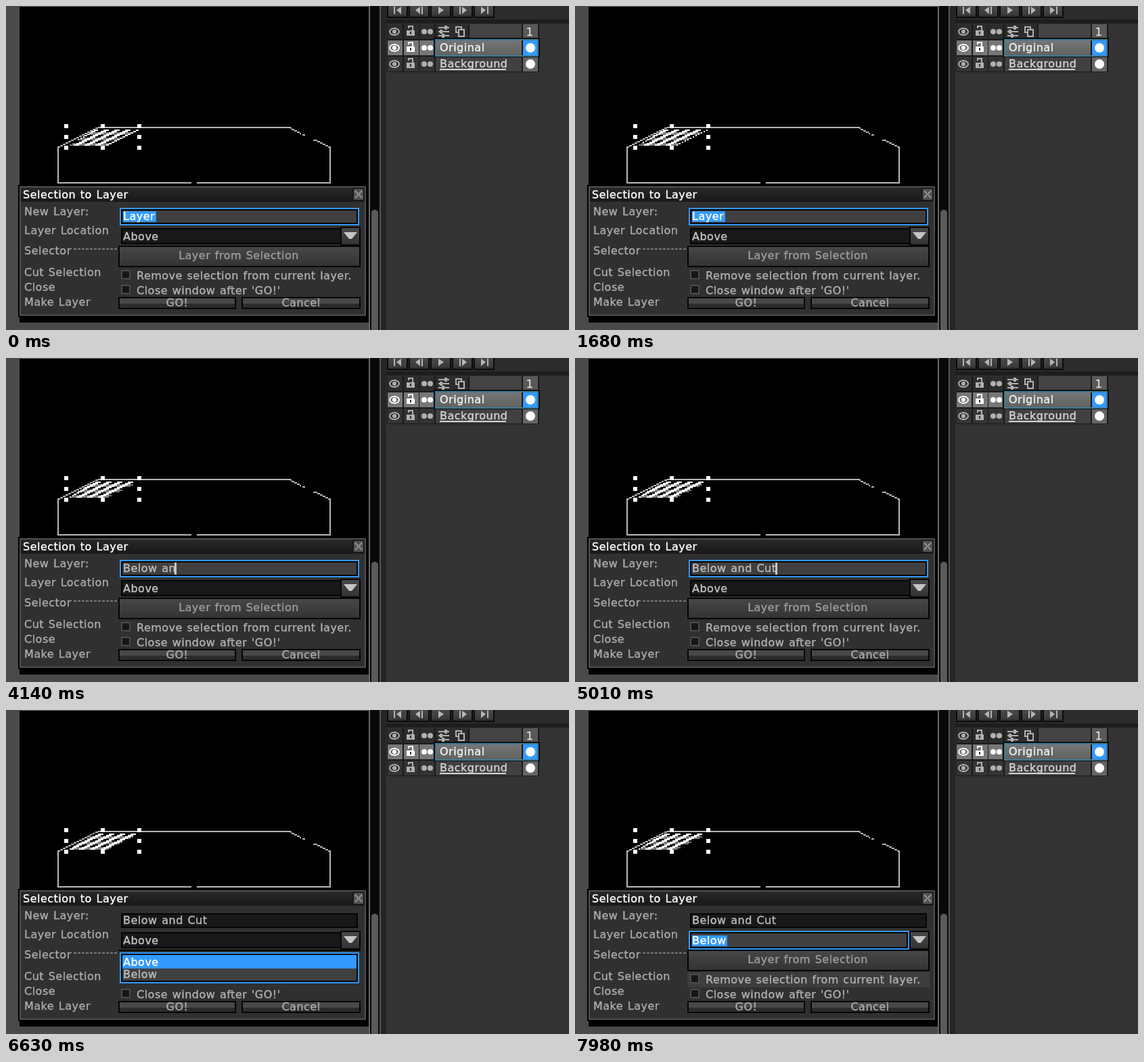
An HTML page with a canvas that plays this animation: 832 px wide and 480 px high, repeating every 8 s.

```html
<!DOCTYPE html>
<html lang="en">
<head>
<meta charset="utf-8">
<title>Selection to Layer</title>
<style>
html, body { margin: 0; width: 100%; height: 100%; overflow: hidden; background: #000; }
canvas { display: block; width: 832px; height: 480px; }
</style>
</head>
<body>
<canvas id="stage" width="832" height="480"></canvas>
<script>
const ctx = document.getElementById('stage').getContext('2d');
const LOOP = 8000;
const BLUE = '#3399ff';
const BODY = '#303030';
const NAME = 'Below and Cut';

// Times of the typed characters and of the dialog's state changes, in ms.
const KEYS = [2730, 3090, 3450, 3540, 3660, 3780, 3930, 4050, 4170, 4380, 4560, 4740, 4890];
const T = { blur: 6120, open: 6390, pick: 7110, close: 7590, hover: 7830 };

function box(x, y, x2, y2, color) {
  ctx.fillStyle = color;
  ctx.fillRect(x, y, x2 - x, y2 - y);
}

function shade(y, y2, top, bottom) {
  const g = ctx.createLinearGradient(0, y, 0, y2);
  g.addColorStop(0, top);
  g.addColorStop(1, bottom);
  return g;
}

function frame(x, y, x2, y2, edge, fill, w = 2) {
  box(x, y, x2, y2, edge);
  box(x + w, y + w, x2 - w, y2 - w, fill);
}

function setFont() {
  ctx.font = '16px "DejaVu Sans", sans-serif';
  ctx.letterSpacing = '0.5px';
  ctx.wordSpacing = '1px';
}

// Text with a hairline outline, which gives the stems two full pixels.
function text(str, x, y, color, align = 'left') {
  setFont();
  ctx.textAlign = align;
  ctx.fillStyle = ctx.strokeStyle = color;
  ctx.lineWidth = 0.4;
  ctx.fillText(str, x, y);
  ctx.strokeText(str, x, y);
  return ctx.measureText(str).width;
}

function poly(points, color) {
  ctx.fillStyle = color;
  ctx.beginPath();
  points.forEach(([x, y]) => ctx.lineTo(x, y));
  ctx.fill();
}

function dot(x, y, r, color) {
  ctx.fillStyle = color;
  ctx.beginPath();
  ctx.arc(x, y, r, 0, 7);
  ctx.fill();
}

// Line made of blocks two pixels in size.
function pixelLine(x1, y1, x2, y2, color) {
  const n = Math.max(Math.abs(x2 - x1), Math.abs(y2 - y1)) / 2;
  for (let i = 0; i <= n; i++) {
    const x = x1 + (x2 - x1) * i / n;
    const y = y1 + (y2 - y1) * i / n;
    const px = Math.floor(x / 2) * 2;
    const py = Math.round((y - 1) / 2) * 2 + 1;
    box(px, py - 1, px + 2, py + 1, color);
  }
}

function drawOutline() {
  const c = '#b8b8b8';
  box(76, 209, 78, 263, c);
  box(478, 209, 480, 263, c);
  box(76, 261, 274, 263, c);
  box(282, 261, 480, 263, c);
  box(136, 179, 421, 181, c);
  pixelLine(77, 209, 136, 180, c);
  pixelLine(420, 181, 434, 188, c);
  pixelLine(438, 190, 441, 191, c);
  pixelLine(454, 198, 478, 209, c);
}

// Bands of black and grey, crossed by slanted white bars that march right.
function drawSelection(t) {
  const phase = Math.floor(t / 97.5 + 0.2) % 8 * 2;
  for (let row = 0; row < 12; row++) {
    const y = 183 + row * 2;
    const left = Math.round((130 - row * 3.3) / 2) * 2;
    const base = row % 4 < 2 ? '#000000' : '#777777';
    for (let x = left; x < 196 - row * 4; x += 2) {
      const lit = (x + row * 4 - phase) % 16 < 8;
      box(x, y, x + 2, y + 2, lit ? '#ffffff' : base);
    }
  }
  for (const x of [89, 143, 197])
    for (const y of [178, 194, 210])
      if (x !== 143 || y !== 194) box(x - 3, y - 3, x + 3, y + 3, '#ffffff');
}

function drawEye(x, y, c) {
  ctx.strokeStyle = c;
  ctx.lineWidth = 2;
  ctx.beginPath();
  ctx.ellipse(x, y, 7, 5, 0, 0, 7);
  ctx.stroke();
  dot(x, y, 3, c);
}

function drawLock(x, y, c) {
  box(x - 6, y - 1, x + 6, y + 7, c);
  box(x - 4, y - 8, x + 4, y - 6, c);
  box(x + 2, y - 8, x + 4, y, c);
  box(x - 4, y - 8, x - 2, y - 4, c);
  box(x - 1, y + 1, x + 1, y + 5, '#333333');
}

function drawRow(y, cell, icon) {
  for (const x of [564, 588, 611]) box(x, y, x + 22, y + 22, cell);
  drawEye(574, y + 11, icon);
  drawLock(598, y + 10, icon);
  dot(618, y + 11, 4, icon);
  dot(627, y + 11, 4, icon);
}

function drawTransport() {
  for (let i = 0; i < 5; i++) {
    const x = 563 + i * 32;
    frame(x, -4, x + 31, 18, '#0b0b0b', shade(0, 16, '#484848', '#383838'));
    box(x + 2, 14, x + 29, 16, '#2c2c2c');
  }
  const c = '#b5b5b5';
  box(573, 1, 575, 12, c);
  poly([[584, 1], [584, 12], [577, 6]], c);
  poly([[612, 1], [612, 12], [605, 6]], c);
  box(614, 1, 616, 12, c);
  poly([[639, 1], [639, 12], [647, 6]], c);
  box(670, 1, 672, 12, c);
  poly([[674, 1], [674, 12], [681, 6]], c);
  poly([[702, 1], [702, 12], [709, 6]], c);
  box(711, 1, 713, 12, c);
}

function drawPanel() {
  box(536, 0, 538, 480, '#676767');
  box(538, 0, 552, 480, '#090909');
  box(540, 304, 550, 480, '#5a5a5a');
  box(542, 302, 548, 304, '#5a5a5a');
  box(552, 0, 554, 480, '#565656');
  box(554, 0, 832, 480, '#333333');
  box(554, 0, 562, 480, '#252525');
  box(562, 0, 832, 26, '#2c2c2c');
  box(562, 20, 832, 26, '#1d1d1d');
  drawTransport();

  box(563, 27, 788, 98, '#1a1a1a');
  drawRow(27, '#2c2c2c', '#b0b0b0');
  drawRow(51, '#777777', '#ffffff');
  drawRow(75, '#343434', '#b0b0b0');

  box(635, 27, 683, 48, '#2c2c2c');
  box(685, 27, 762, 48, '#444444');
  box(764, 27, 786, 48, '#595959');
  text('1', 774, 44, '#e0e0e0', 'center');
  const c = '#b0b0b0';
  [[31, 648], [37, 641], [43, 644]].forEach(([y, x]) => {
    box(639, y, 655, y + 2, c);
    box(x, y - 2, x + 4, y + 4, c);
  });
  frame(664, 30, 674, 40, c, '#2c2c2c');
  frame(668, 34, 678, 46, c, '#2c2c2c');

  box(632, 47, 789, 76, '#0c0c0c');
  frame(634, 49, 787, 75, '#397b99', '#111111');
  box(636, 51, 762, 73, shade(51, 73, '#757575', '#626262'));
  box(764, 51, 785, 73, BLUE);
  text('Original', 641, 67, '#f2f2f2');
  dot(775, 62, 7, '#ffffff');

  box(635, 76, 762, 97, '#404040');
  box(764, 76, 786, 97, '#666666');
  text('Background', 641, 91, '#d2d2d2');
  box(641, 93, 739, 95, '#d2d2d2');
  dot(775, 86, 7, '#ffffff');
}

function drawField(x2, y, y2, focused) {
  if (focused) box(168, y, x2, y2, BLUE);
  frame(170, y + 2, x2 - 2, y2 - 2, '#050505', focused ? '#404040' : '#181818');
}

function drawMarked(str, y) {
  setFont();
  box(173, y - 13, 174 + Math.ceil(ctx.measureText(str).width), y + 3, BLUE);
  text(str, 173, y, '#ffffff');
}

function drawName(t) {
  const focused = t < T.blur;
  drawField(522, 299, 325, focused);
  const count = KEYS.filter(k => t >= k).length;
  if (!count) {
    drawMarked('Layer', 317);
    return;
  }
  const width = text(NAME.slice(0, count), 173, 317, '#bdbdbd');
  const lastKey = KEYS[count - 1];
  if (focused && (t - lastKey) % 1000 < 500) {
    const x = 171 + Math.round(width);
    box(x, 303, x + 3, 321, '#c8c8c8');
  }
}

function drawLocation(t) {
  const closed = t >= T.close;
  drawField(closed ? 494 : 522, 327, 355, closed);
  const value = t < T.pick ? 'Above' : 'Below';
  if (closed) drawMarked(value, 347);
  else text(value, 173, 347, '#c4c4c4');
  frame(494, 327, 524, 355, '#050505', shade(329, 353, '#484848', '#333333'));
  poly([[499, 335], [519, 335], [511, 345], [507, 345]], '#c4c4c4');
}

function drawButton(x, y, x2, y2, label, color) {
  frame(x, y, x2, y2, '#050505', shade(y, y2, '#484848', '#323232'));
  text(label, (x + x2) / 2 - 1, (y + y2) / 2 + 4, color, 'center');
}

function drawSmallButton(x, x2, label) {
  frame(x, 431, x2, 449, '#050505', '#484848');
  box(x + 2, 441, x2 - 2, 447, '#2c2c2c');
  text(label, (x + x2) / 2, 445, '#aaaaaa', 'center');
}

function drawCheck(y, label) {
  frame(170, y - 7, 184, y + 7, '#4b4b4b', '#161616');
  text(label, 193, y + 7, '#b0b0b0');
}

function drawList(t) {
  box(166, 357, 524, 411, BODY);
  frame(168, 359, 522, 405, BLUE, '#050505');
  box(172, 363, 518, 401, '#404040');
  const below = t >= T.pick;
  box(172, below ? 383 : 363, 518, below ? 401 : 383, BLUE);
  text('Above', 173, 379, below ? '#bdbdbd' : '#ffffff');
  text('Below', 173, 397, below ? '#ffffff' : '#bdbdbd');
}

function drawDialog(t) {
  box(20, 460, 536, 469, '#000000');
  box(18, 265, 534, 461, '#000000');
  frame(20, 267, 532, 459, '#505050', BODY);
  box(22, 269, 530, 290, shade(269, 290, '#292929', '#181818'));
  text('Selection to Layer', 25, 285, '#ffffff');
  frame(512, 269, 530, 289, '#1a1a1a', '#555555');
  pixelLine(517, 275, 525, 283, '#a8a8a8');
  pixelLine(525, 275, 517, 283, '#a8a8a8');

  const labels = [['New Layer:', 310], ['Layer Location', 338], ['Selector', 368],
    ['Cut Selection', 400], ['Close', 422], ['Make Layer', 444]];
  labels.forEach(([label, y]) => text(label, 27, y, '#ababab'));
  for (let x = 100; x < 164; x += 6) box(x, 359, x + 4, 361, '#777777');

  drawName(t);
  drawLocation(t);
  drawButton(166, 355, 524, 387, 'Layer from Selection', '#9c9c9c');
  if (t >= T.hover) box(166, 388, 524, 411, '#3d3d3d');
  drawCheck(398, 'Remove selection from current layer.');
  drawCheck(420, "Close window after 'GO!'");
  drawSmallButton(166, 340, 'GO!');
  drawSmallButton(348, 524, 'Cancel');
  if (t >= T.open && t < T.close) drawList(t);
}

function draw(t) {
  box(0, 0, 832, 480, '#000000');
  box(0, 0, 20, 480, '#4a4a4a');
  box(20, 0, 536, 1, '#686868');
  box(0, 469, 536, 480, '#4a4a4a');
  drawOutline();
  drawSelection(t);
  drawPanel();
  drawDialog(t);
}

const start = performance.now();
function tick() {
  draw((performance.now() - start) % LOOP);
  requestAnimationFrame(tick);
}
tick();
</script>
</body>
</html>
```
